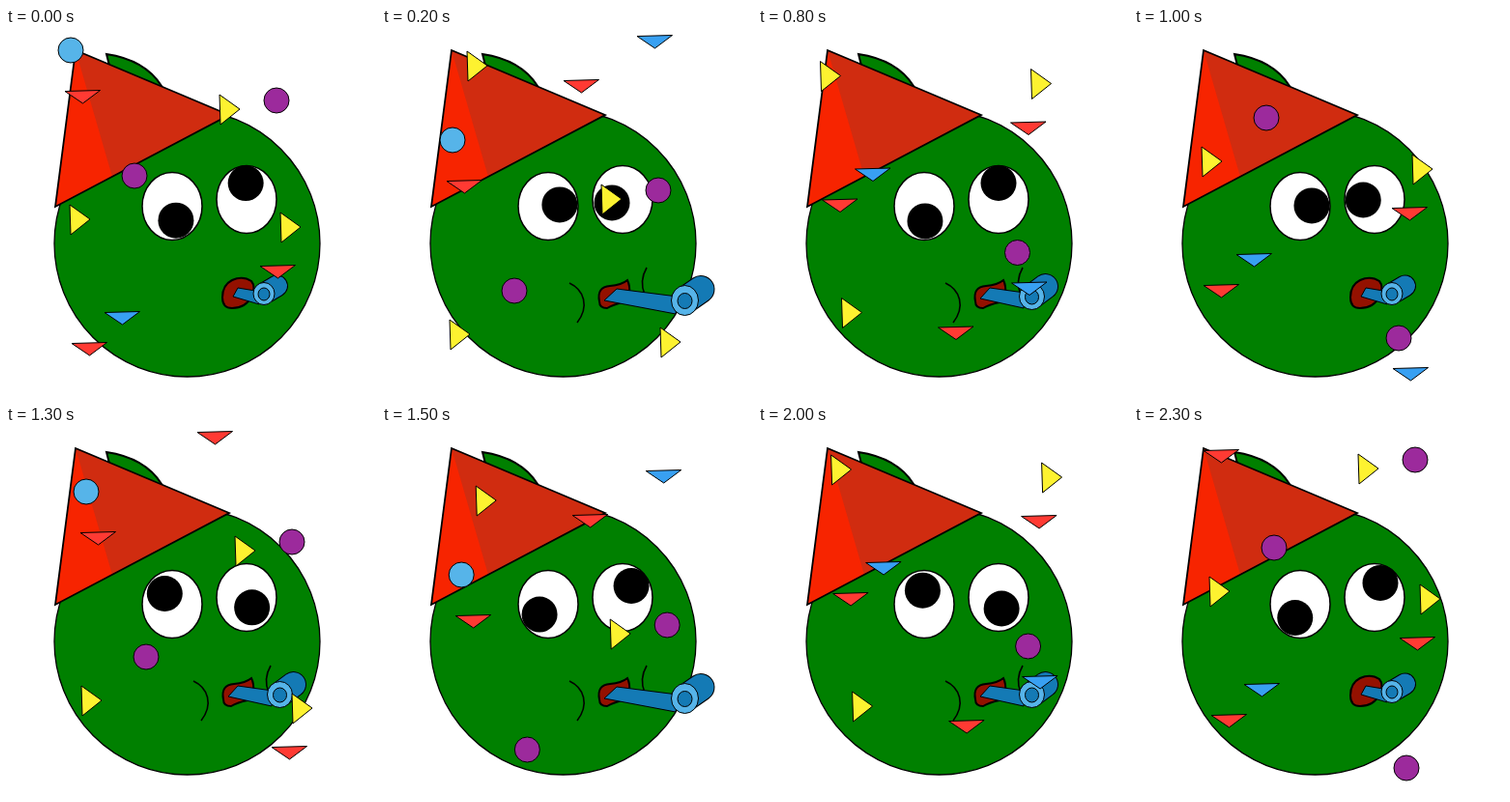
Animation of 383 by 383 pixels, one loop 2.4 s. Source, as an HTML page with a canvas:

```html
<!DOCTYPE html>
<html>
<head>
<meta charset="utf-8">
<style>
html, body { margin: 0; width: 100%; height: 100%; overflow: hidden; background: #fff; }
canvas { display: block; }
</style>
</head>
<body>
<canvas id="stage" width="383" height="383"></canvas>
<script>
const ctx = document.getElementById('stage').getContext('2d');
const STEP = 100, STEPS = 24;
const DARK = '#147ab5', LIGHT = '#56b4e9', PURPLE = '#9c2a9c',
      YELLOW = '#fdf230', RED = '#ff3a33', BLUE = '#38a0f2';

function paint(path, fill, line = 1, ink = '#000') {
  if (fill) { ctx.fillStyle = fill; ctx.fill(path); }
  if (line) { ctx.lineWidth = line; ctx.strokeStyle = ink; ctx.stroke(path); }
}
function oval(x, y, rx, ry, fill, line) {
  const p = new Path2D();
  p.ellipse(x, y, rx, ry, 0, 0, 7);
  paint(p, fill, line);
}
const shape = (d, fill, line) => paint(new Path2D(d), fill, line);

// Piecewise linear lookup in rows of [step, ...values]
function sample(keys, k) {
  const i = keys.findIndex((key, n) => n && k <= key[0]);
  if (i < 0 || k < keys[0][0]) return null;
  const a = keys[i - 1], b = keys[i], f = (k - a[0]) / (b[0] - a[0]);
  return a.slice(1).map((v, n) => v + (b[n + 1] - v) * f);
}

// Pupil angles in degrees: left, right
const gaze = [
  [0, 71, -94], [2, -8, -204], [6, -185, -348], [10, -364, -552],
  [13, -490, -658], [18, -720, -915], [23, -964, -1140], [24, -1009, -1174]
];

// Confetti: kind, colour, offset from the group's anchor
const kinds = {
  ball: { half: 13 },
  side: { half: 16, d: 'M-10-15L11 0L-9 16Z' },
  down: { half: 7, d: 'M-18-5.5L18.5-6.5L.5 7Z' }
};
const confetti = [
  ['ball', PURPLE, 60, -367], ['side', YELLOW, 3, -322], ['side', YELLOW, 221, -314],
  ['down', RED, 208, -268], ['down', BLUE, 47, -220], ['down', RED, 13, -188],
  ['ball', PURPLE, 197, -139], ['down', BLUE, 209, -102], ['side', YELLOW, 25, -77],
  ['down', RED, 133, -56], ['ball', LIGHT, 0, 0], ['down', RED, 12, 48],
  ['ball', PURPLE, 213, 52], ['side', YELLOW, 164, 61]
];
const falls = [
  [[-2, 76, -61], [-1, 78, -17], [0, 67, 23], [2, 73, 116], [6, 66, 283],
   [10, 77, 460], [13, 85, 606], [16, 93, 750]],
  [[11, 79, -20], [13, 83, 68], [18, 81, 283], [23, 85, 493],
   [24, 73, 520], [26, 77, 639], [29, 83, 820]]
];

// Blower: strap outline, roll front, roll back, front radii, core radii
const blowers = {
  rolled: ['M240 269L264 273L262 286L235 278Z', 267, 275, 280.5, 267, 11, 11.5, 6, 6.5],
  half: ['M240 269L276 274L275 290L230 280Z', 283.5, 278, 297.5, 267.5, 13, 13.5, 7, 7.5],
  out: ['M243 270L306 278L304 296L230 282Z', 313.5, 282, 330, 270.5, 14, 15.5, 7.5, 8]
};

function drawBlower([strap, x, y, bx, by, rx, ry, cx, cy]) {
  const roll = new Path2D(`M${x} ${y}L${bx} ${by}`);
  ctx.lineCap = 'round';
  paint(roll, null, rx * 2 + 1, '#000');
  paint(roll, null, rx * 2 - 1, DARK);
  ctx.lineCap = 'butt';
  shape(strap, DARK);
  oval(x, y, rx, ry, LIGHT);
  oval(x, y + .5, cx, cy, DARK);
}

function drawHead(k) {
  shape('M104 27Q144 33 161 60L140 66L107 39Z', '#008000', 2);
  oval(187.5, 223, 137.5, 138, '#008000', 1.3);

  oval(172, 184.5, 31, 35, '#fff', 1.5);
  oval(249, 177.5, 31, 35, '#fff', 1.5);
  const [left, right] = sample(gaze, k).map(a => a * Math.PI / 180);
  oval(172 + 12 * Math.cos(left), 185 + 15 * Math.sin(left), 18.5, 18.5, '#000', 0);
  oval(249 + 12 * Math.cos(right), 175 + 14.5 * Math.sin(right), 18.5, 18.5, '#000', 0);

  shape('M72 23L231 90L51 185Z', '#d02c10', 0);
  shape('M72 23L110 154L51 185Z', '#f72400', 0);
  shape('M72 23L231 90L51 185Z', null, 1.8);

  const phase = k % 12;
  const pose = phase > 1 && phase < 8 ? 'out' : phase == 1 || phase == 8 ? 'half' : 'rolled';
  if (pose == 'rolled') {
    shape('M224 279Q224 266 234 261Q245 256 254 262Q259 268 254 278Q248 290 234 290Q224 290 224 279Z', '#941100', 2);
  } else {
    shape('M194 264C209 271 215 288 202 305M274 248Q266 262 272 276', null, 1.6);
    shape('M225 283Q222 268 236 267Q248 266 254 261Q257 267 256 275L250 284Q240 286 233 290Q225 290 225 283Z', '#941100', 2);
  }
  drawBlower(blowers[pose]);
}

function drawConfetti(x, y) {
  for (const [kind, fill, dx, dy] of confetti) {
    const { half, d } = kinds[kind], px = x + dx, py = y + dy;
    // Pieces show only while wholly on stage
    if (py - half < 5 || py + half > 370) continue;
    ctx.save();
    ctx.translate(px, py);
    if (d) shape(d, fill); else oval(0, 0, half, half, fill);
    ctx.restore();
  }
}

function draw(k) {
  ctx.fillStyle = '#fff';
  ctx.fillRect(0, 0, 383, 383);
  drawHead(k);
  for (const fall of falls)
    for (const turn of [-STEPS, 0, STEPS]) {
      const at = sample(fall, k + turn);
      if (at) drawConfetti(...at);
    }
}

const start = performance.now();
function tick() {
  draw(Math.floor((performance.now() - start) / STEP) % STEPS);
  requestAnimationFrame(tick);
}
tick();
</script>
</body>
</html>
```
